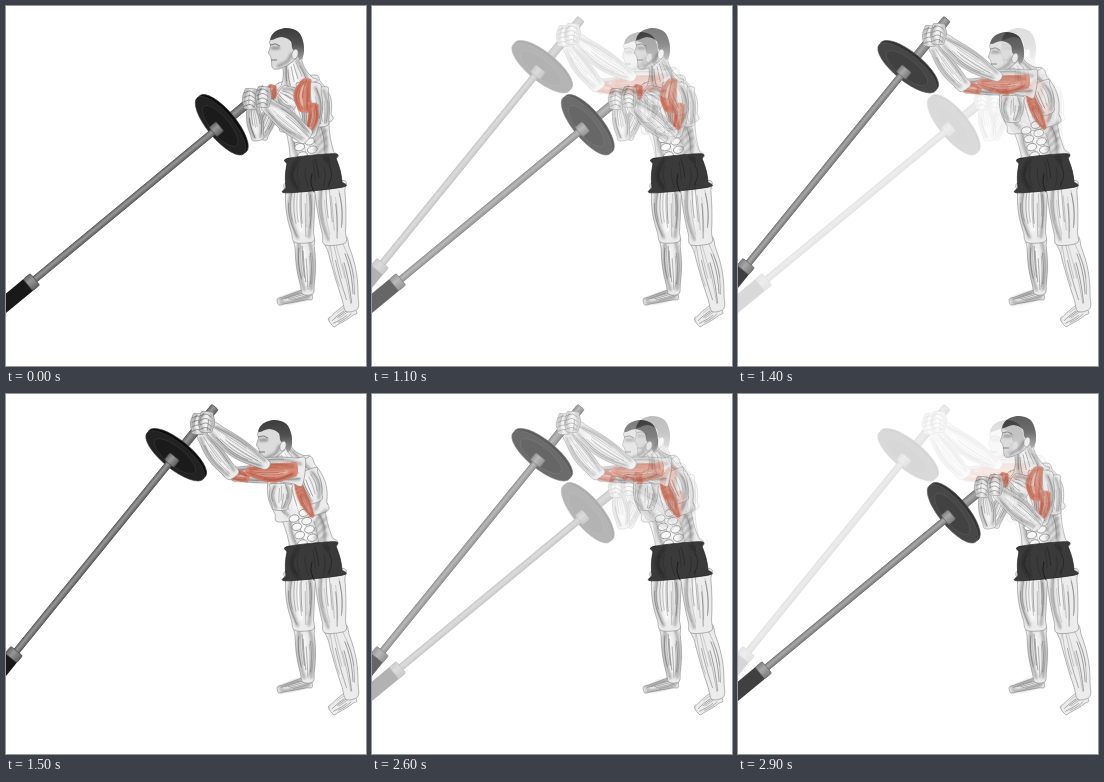
An HTML page for the animation above (3 s loop, 360 by 360 pixels).

```html
<!DOCTYPE html>
<html lang="en">
<head>
<meta charset="utf-8">
<style>
html, body { margin: 0; width: 100%; height: 100%; overflow: hidden; background: #fff }
svg { display: block; width: 100vw; height: 100vh }
path { stroke-linejoin: round; stroke-linecap: round }
.skin { fill: #ececec; stroke: #858585; stroke-width: .6 }
.red { fill: #d98a76 }
.cloth { fill: #3a3a3a; stroke: #222; stroke-width: .7 }
.fiber { fill: none; stroke-width: .7 }
.shade, .glow { fill: none; filter: url(#soft) }
.shade { stroke-width: 3; stroke-opacity: .45 }
.glow { stroke: #fff; stroke-opacity: .65 }
.line { fill: none; stroke: #555; stroke-width: .8 }
.steel { fill: url(#steel); stroke: #505050; stroke-width: .8 }
</style>
</head>
<body>
<svg id="stage" viewBox="0 0 360 360"></svg>
<script>
const LOOP = 3000, STEP = 100, STEPS = 6;
const INK = { skin: '#606060', red: '#a34835', cloth: '#1c1c1c' };

let seed = 7;
const random = () => (seed = seed * 16807 % 2147483647) / 2147483647;
const mix = (a, b, t) => a + (b - a) * t;
const range = (n, f) => Array.from({ length: n }, (_, i) => f(i));

// Smooth curve through a list of [x, y] points.
function curve(p, closed) {
  const n = p.length;
  const at = i => closed ? p[(i + n) % n] : p[Math.max(0, Math.min(n - 1, i))];
  const parts = range(closed ? n : n - 1, i => {
    const [a, b, c, d] = [at(i - 1), at(i), at(i + 1), at(i + 2)];
    return `C${b.map((v, k) => v + (c[k] - a[k]) / 6)} ${c.map((v, k) => v - (d[k] - b[k]) / 6)} ${c}`;
  });
  return 'M' + p[0] + parts.join('') + (closed ? 'Z' : '');
}
const path = (cls, points, closed, extra = '') =>
  `<path class="${cls}" d="${curve(points, closed)}" ${extra}/>`;

// A tapered muscle between two [x, y, radius] ends, shaded and striated along its length.
function muscle(kind, [x1, y1, r1], [x2, y2, r2], bulge = 0, bend = 0, fibers = 7) {
  const length = Math.hypot(x2 - x1, y2 - y1);
  const nx = (y1 - y2) / length, ny = (x2 - x1) / length;
  const at = (t, u) => {
    const arc = Math.sin(Math.PI * t);
    const offset = bend * arc + u * (mix(r1, r2, t) + bulge * arc);
    return [mix(x1, x2, t) + nx * offset, mix(y1, y2, t) + ny * offset];
  };
  const along = (u, from = .08, to = .92) => range(6, i => {
    const t = mix(from, to, i / 5);
    return at(t, u * (.65 + .35 * Math.sin(Math.PI * t)));
  });
  const ink = `stroke="${INK[kind]}"`;
  const outline = [...range(7, i => at(i / 6, 1)), ...range(7, i => at(1 - i / 6, -1))];
  const core = mix(r1, r2, .5) * .4;
  return path(kind, outline, true) +
    path('shade', along(.78), false, ink) + path('shade', along(-.78), false, ink) +
    (kind === 'cloth' ? '' : path('glow', along(.1, .2, .8), false, `stroke-width="${core}"`)) +
    range(fibers, i => {
      const start = random() * .4, u = mix(-.9, .9, (i + random()) / fibers);
      return path('fiber', along(u, start, start + .55), false, `${ink} opacity="${mix(.3, .85, random())}"`);
    }).join('');
}

const bar = (x, halfWidth, length, extra = 'class="steel"') =>
  `<rect x="${x}" y="${-halfWidth}" width="${length}" height="${halfWidth * 2}" rx="1.5" ${extra}/>`;

function barbell(x, y, angle, length, tip) {
  const disc = (cx, scale, fill) =>
    `<ellipse cx="${cx}" rx="${13 * scale}" ry="${36.5 * scale}" fill="${fill}" stroke="#383838" stroke-width=".6"/>`;
  return `<g transform="translate(${x} ${y}) rotate(${angle})">` +
    bar(-length - 60, 7.5, 56, 'fill="#191919"') + bar(0, 4.2, tip) +
    disc(9, 1, '#0b0b0b') + disc(6, 1, '#222') + disc(5.5, .7, '#1b1b1b') +
    bar(-length, 3.2, length) + bar(-4, 6, 9) + bar(-length - 5, 7.5, 9) + '</g>';
}

function fist(x, y) {
  return muscle('skin', [x + 1, y - 10, 5], [x, y + 10, 5], 3, 0, 2) +
    range(4, i => path('line', [[x - 6, y - 6 + i * 4.5], [x, y - 8 + i * 4.5], [x + 5, y - 5 + i * 4.5]], false, 'opacity=".7"')).join('');
}

function head(x, y) {
  const face = [[-16, -9], [-16, -3], [-18, 4], [-16, 7], [-15, 12], [-14, 19], [-8, 20], [3, 15], [12, 6], [14, -8], [0, -18]];
  const hair = [[-16, -9], [-12, -17], [0, -21], [12, -17], [17, -6], [17, 6], [13, 11], [10, 3], [6, 0], [4, -8], [-5, -12]];
  return `<g transform="translate(${x} ${y})">` + path('skin', face, true, 'style="fill:#dcdcdc"') +
    path('shade', [[5, 5], [1, 12], [-8, 17]], false, 'stroke="#555"') +
    path('shade', [[-14, -1], [-8, -1]], false, 'stroke="#333"') +
    path('line', [[-16, -4], [-11, -5], [-7, -3]]) + path('line', [[-15, 11], [-10, 11]]) +
    path('', hair, true, 'fill="url(#hair)"') +
    '<ellipse class="skin" cx="8.5" cy="5" rx="3" ry="5" transform="rotate(15 8 5)"/></g>';
}

const abdomen = range(8, i => {
  const row = i >> 1, side = i % 2;
  return `<ellipse cx="${288 + row * 2.7 + side * 11}" cy="${124 + row * 8.5 - side * 3}" rx="5" ry="3.6"
    transform="rotate(-15 ${290 + row * 2} ${124 + row * 8})" fill="#f7f7f7" stroke="#858585" stroke-width=".7"/>`;
}).join('') + range(4, i =>
  path('shade', [[320, 116 + i * 8], [312, 124 + i * 8], [309, 130 + i * 7]], false, 'stroke="#777"')).join('');

const lowerBody =
  muscle('skin', [305, 287, 6], [272, 296, 3], 0, 0, 5) +
  muscle('skin', [298, 232, 9], [302, 288, 5], 2.5, 0, 8) +
  muscle('skin', [295, 176, 15], [298, 236, 9], 2, 2, 10) +
  muscle('skin', [347, 301, 6.5], [325, 317, 4.5], 1, 0, 6) +
  muscle('skin', [329, 232, 10], [346, 304, 6], 3, -2, 9) +
  muscle('skin', [323, 176, 15], [329, 238, 10], 1.5, 0, 10) +
  muscle('cloth', [305, 150, 23], [308.5, 184, 28], 2) +
  path('line', [[308, 186], [305, 177], [306, 168]], false, 'style="stroke:#151515"');

const torso = (neck, shoulders, ribs) =>
  muscle('skin', [...ribs, 23], [307, 156, 23], -2, 0, 6) +
  muscle('skin', [...shoulders, 18], [ribs[0] + 1, ribs[1] + 8, 23], 9, 0, 12) +
  muscle('skin', [...neck, 10], [shoulders[0] + 2, shoulders[1] + 7, 19], -3, 0, 6) + abdomen;

const racked =
  muscle('skin', [268, 100, 7], [254, 132, 6], 1) +
  muscle('skin', [246, 98, 5], [252, 134, 5], 3) +
  torso([285, 53], [290, 73], [300, 113]) +
  muscle('skin', [273, 86, 7], [291, 98, 9], 4) +
  muscle('red', [267, 79, 3], [262, 96, 3], 3) +
  muscle('skin', [312, 82, 9], [317, 120, 5], 2) +
  head(280.5, 43) +
  barbell(210, 123.5, -39.6, 239, 64) + fist(244, 93) +
  muscle('skin', [302, 77, 11], [301, 131, 7], 1, -5) +
  muscle('red', [301, 73, 4], [299, 106, 5], 4, 4) +
  muscle('red', [307, 97, 5], [301, 128, 3], 1, -3) +
  muscle('skin', [302, 132, 7], [259, 97, 6], 4, 0, 9) +
  fist(257, 91);

const pressed =
  muscle('skin', [226, 80, 6], [268, 80, 9], 1) +
  muscle('red', [217, 78, 3], [243, 84, 4], 2) +
  muscle('skin', [195, 38, 5], [228, 82, 6], 3, 2) +
  torso([275, 55], [284, 66], [296, 115]) +
  muscle('skin', [275, 90, 10], [274, 116, 6], 3) +
  muscle('skin', [298, 78, 12], [310, 108, 6], 3) +
  range(4, i => muscle('red', [291 + i, 87 + i * 4, 3], [298 + i * 3, 108 + i * 5, 1.5], 2, 0, 2)).join('') +
  head(268.5, 47) +
  barbell(165.5, 66.5, -50.9, 249.5, 69) + fist(192, 30) +
  muscle('skin', [246, 72, 7], [298, 78, 13], 2) +
  muscle('red', [240, 77, 3], [291, 75, 6], 5, 3, 10) +
  muscle('skin', [204, 33, 6], [262, 72, 4], 5, 2, 9) +
  fist(200, 28);

document.getElementById('stage').innerHTML = `
  <defs>
    <linearGradient id="steel" x2="0" y2="1"><stop stop-color="#686868"/><stop offset=".4" stop-color="#979797"/>
      <stop offset="1" stop-color="#606060"/></linearGradient>
    <linearGradient id="hair" x2="0" y2="1"><stop stop-color="#3c3c3c"/><stop offset=".5" stop-color="#505050"/>
      <stop offset="1" stop-color="#a0a0a0"/></linearGradient>
    <filter id="soft" filterUnits="userSpaceOnUse" width="360" height="360"><feGaussianBlur stdDeviation="1.2"/></filter>
  </defs>
  <rect width="360" height="360" fill="#fff"/>${racked}
  <g id="pressed"><rect width="360" height="360" fill="#fff"/>${pressed}</g>${lowerBody}`;

const pressedPose = document.getElementById('pressed');
const stepsSince = (t, start) => Math.max(0, Math.min(STEPS, Math.floor((t - start) / STEP) + 1));

function frame() {
  const t = performance.now() % LOOP;
  pressedPose.setAttribute('opacity', (stepsSince(t, 1000) - stepsSince(t, 2500)) / STEPS);
  requestAnimationFrame(frame);
}
frame();
</script>
</body>
</html>
```
